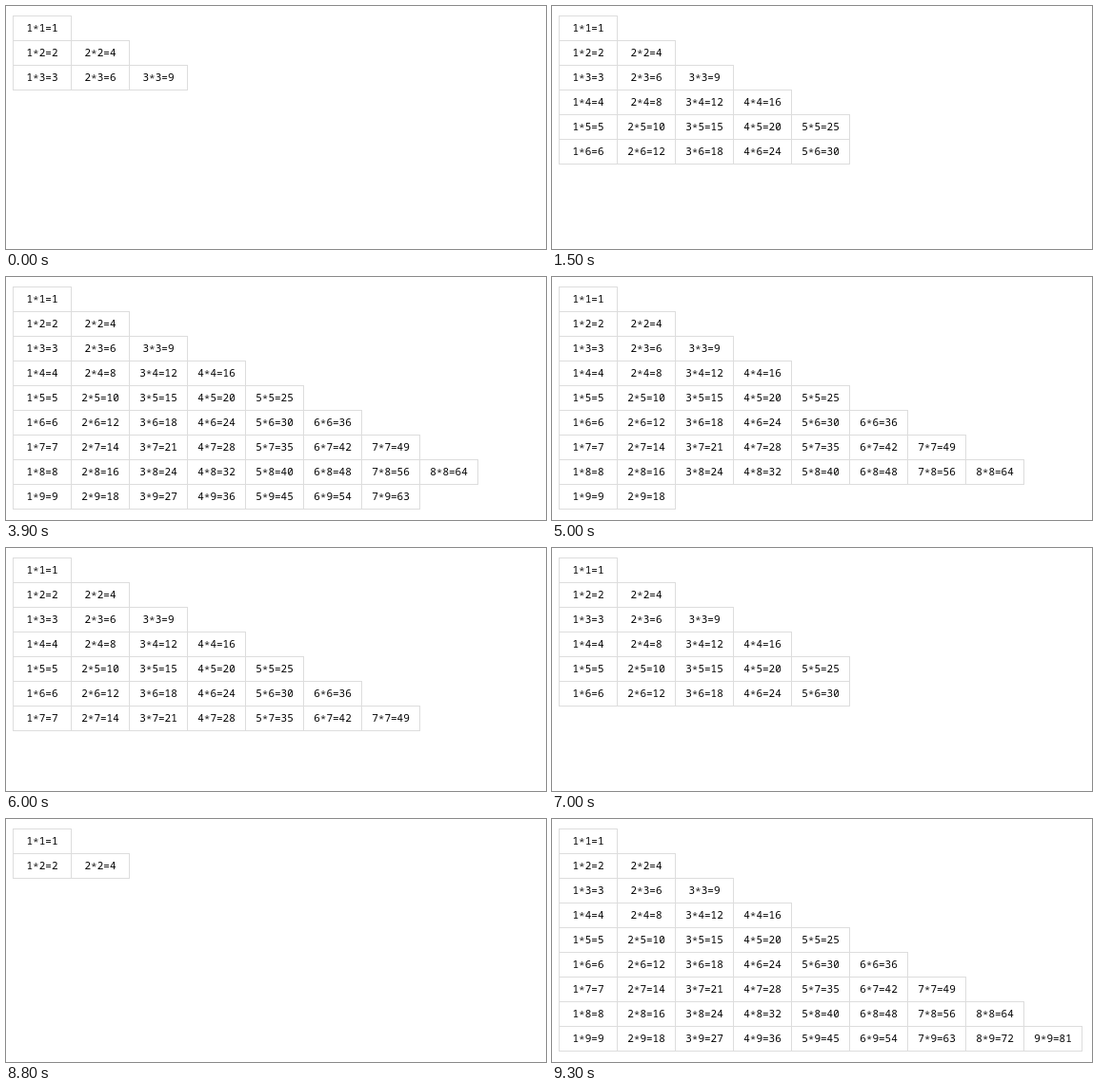
These frames come from a looping animation (567x256 px, 9.9 s). An HTML page:

```html
<!DOCTYPE html>
<html lang="en">
<head>
<meta charset="utf-8">
<title>Multiplication table</title>
<style>
  html, body { margin: 0; width: 100%; height: 100%; overflow: hidden; background: #fff; }
  #table { position: relative; width: 567px; height: 256px; overflow: hidden; }
  .cell {
    position: absolute;
    box-sizing: border-box;
    width: 62px;
    height: 27px;
    border: 1px solid #ddd;
    font: 11px/23px "Noto Sans Mono", monospace;
    color: #000;
    text-align: center;
    white-space: pre;
    visibility: hidden;
  }
  .star { position: relative; top: 1px; color: #222; }
</style>
</head>
<body>
<div id="table"></div>
<script>
const LOOP = 9900, STEP = 100, ROWS = 9, FIRST = 6, ALL = 45;

const table = document.getElementById('table');
const cells = [];
for (let row = 1; row <= ROWS; row++) {
  for (let col = 1; col <= row; col++) {
    const cell = document.createElement('div');
    cell.className = 'cell';
    cell.style.left = 7 + 61 * (col - 1) + 'px';
    cell.style.top = 10 + 26 * (row - 1) + 'px';
    cell.innerHTML = `${col}<span class="star">*</span>${row}=${col * row}`;
    table.append(cell);
    cells.push(cell);
  }
}

// One tick per cell and one pause after each row; ticks run slightly
// faster than the display steps, so now and then two share a step.
const counts = [];
let tick = 0, count = FIRST;
function push() {
  counts[1 + tick - Math.floor((tick + 4.5) / 13.5)] = count;
  tick++;
}
function changeRow(size, delta) {
  for (let i = 0; i < size; i++) {
    count += delta;
    push();
  }
  push();
}
counts[0] = FIRST;
for (let row = 4; row <= ROWS; row++) changeRow(row, 1);
push();
push();
for (let row = ROWS; row >= 2; row--) changeRow(row, -1);
count = ALL;
push();

let shown = 0;
function draw(now) {
  const step = Math.floor((now % LOOP) / STEP);
  const target = counts[Math.min(step, counts.length - 1)];
  if (target !== shown) {
    cells.forEach((cell, i) => {
      cell.style.visibility = i < target ? 'visible' : 'hidden';
    });
    shown = target;
  }
}

const start = performance.now();
function frame() {
  draw(performance.now() - start);
  requestAnimationFrame(frame);
}
frame();
</script>
</body>
</html>
```
